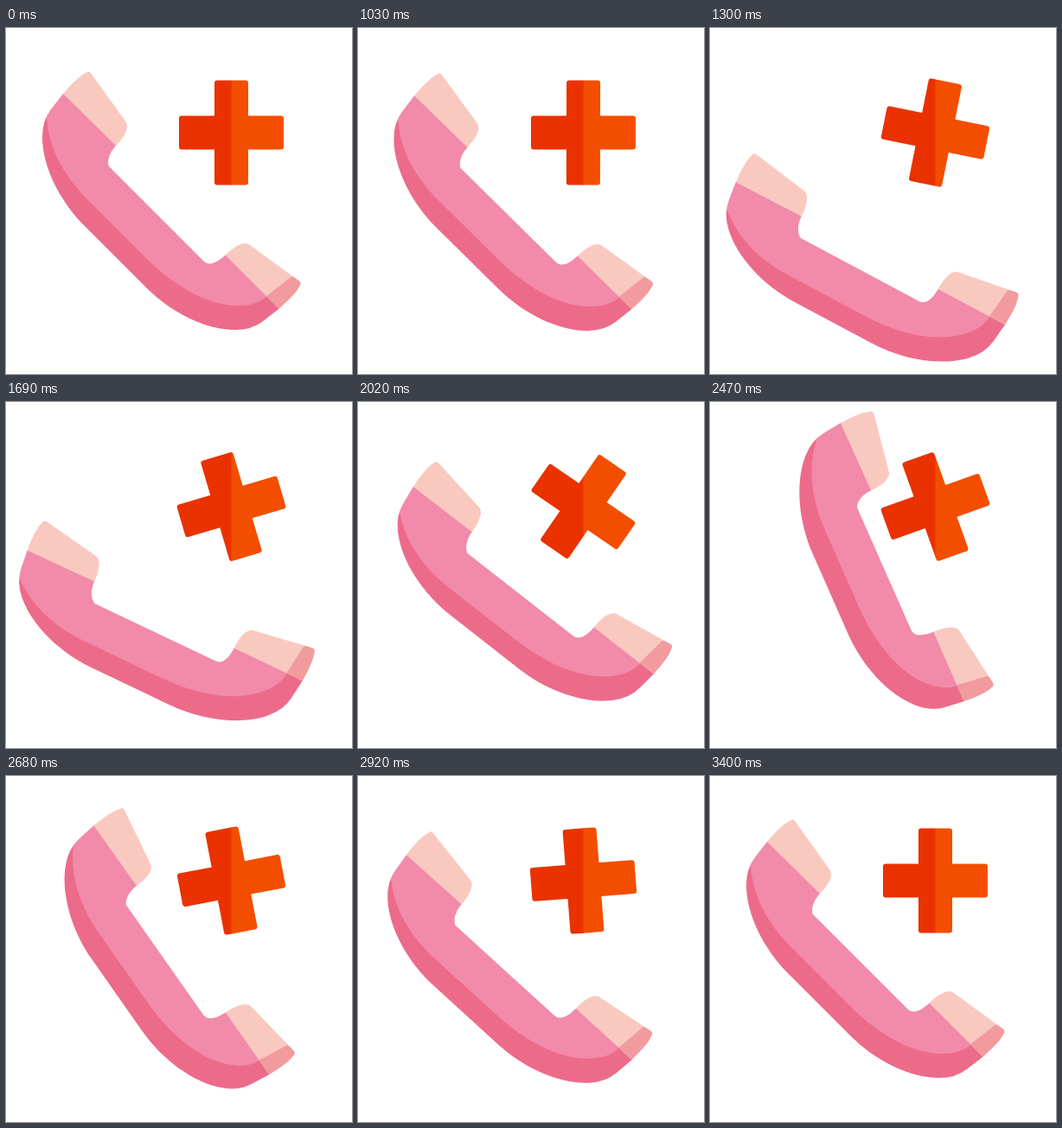
These frames come from a looping animation (400 px wide and 400 px high, 3.43 s). An HTML page:

```html
<!DOCTYPE html>
<html lang="en">
<head>
<meta charset="utf-8">
<title>Emergency call</title>
<style>
  html, body { margin: 0; width: 100%; height: 100%; overflow: hidden; background: #fff; }
  svg { display: block; width: 100%; height: 100%; }
</style>
</head>
<body>
<svg viewBox="0 0 400 400">
  <defs>
    <mask id="handset" maskUnits="userSpaceOnUse" x="0" y="0" width="400" height="400">
      <path fill="#fff" d="M66 76C78 62 86 55 92 52Q96 49 98 52L139 109Q141 113 139 119Q136 127 127 136
        C118 146 117 155 119 160L229 270C235 275 243 272 253 263Q262 254 270 250.5Q278 247.5 282 251
        L339 292.5Q342 295 339 299C336 305 329 313 315 325L297 339Q284 349 265 349
        C231 349 191 329 162 300L91 229C62 200 42 160 42 126Q42 107 52 94Z"/>
    </mask>
    <clipPath id="left"><rect width="261" height="400"/></clipPath>
    <clipPath id="right"><rect x="260.5" width="140" height="400"/></clipPath>
    <path id="plus" d="M244 60.5H277Q280 60.5 280 63.5V101.5H318Q321 101.5 321 104.5V137.5
      Q321 140.5 318 140.5H280V178.5Q280 181.5 277 181.5H244Q241 181.5 241 178.5V140.5H203
      Q200 140.5 200 137.5V104.5Q200 101.5 203 101.5H241V63.5Q241 60.5 244 60.5Z"/>
  </defs>

  <g id="phone">
    <g mask="url(#handset)">
      <path fill="#f28aa9" d="M0 0H400V400H0Z"/>
      <path fill="#ec6b8b" d="M30 103H47C49 138 66 170 94 198L162 266C200 304 238 321 268 321
        C286 321 295 316 302 310L330 288L360 400H0Z"/>
      <path fill="#f9c9c0" d="M66 76L127 136L170 110L95 30L60 70ZM253 262L315 324L370 300L280 220Z"/>
      <path fill="#f19b9e" d="M301 310L330 287.5L370 290L330 339Z"/>
    </g>
  </g>

  <g clip-path="url(#left)"><use class="cross" href="#plus" fill="#ea3200"/></g>
  <g clip-path="url(#right)"><use class="cross" href="#plus" fill="#f34e00"/></g>
</svg>

<script>
const LOOP = 3430, START = 1000, END = 3400, STEP = 30, BEAT = 300;
const phone = document.getElementById('phone');
const crosses = document.querySelectorAll('.cross');

// One key value per beat; the phone rests at both ends
const shiftX = [0, -5.4, -9, 2, 27, 30.5, 0, -5.5, 0];
const shiftY = [0, 60.3, 52, 27, -23, -13.3, 8.6, 5.5, 0];
const tilt = [0, -17, -20.3, -14, 5.5, 21.3, 1.2, -4.6, 0];

const slope = (keys, i) =>
  i > 0 && i < keys.length - 1 ? (keys[i + 1] - keys[i - 1]) / 2 : 0;

// Smooth cubic curve through evenly spaced keys
function curve(keys, pos) {
  const i = Math.min(Math.floor(pos), keys.length - 2);
  const s = pos - i, r = 1 - s;
  return keys[i] + (keys[i + 1] - keys[i]) * s * s * (3 - 2 * s) +
    s * r * (r * slope(keys, i) - s * slope(keys, i + 1));
}

// cubic-bezier(.333, 0, .2, 1)
function ease(x) {
  let lo = 0, hi = 1;
  for (let n = 0; n < 24; n++) {
    const s = (lo + hi) / 2, r = 1 - s;
    if (r * r * s + 0.6 * r * s * s + s * s * s < x) lo = s; else hi = s;
  }
  return lo * lo * (3 - 2 * lo);
}

function draw(now) {
  const steps = Math.floor((now % LOOP - START) / STEP);
  const t = Math.min(END - START, Math.max(0, steps * STEP));
  const [x, y, angle] = [shiftX, shiftY, tilt].map(keys => curve(keys, t / BEAT));
  const turn = 180 * ease(t / (END - START));
  phone.setAttribute('transform', `translate(${x} ${y}) rotate(${angle} 191 200)`);
  crosses.forEach(c => c.setAttribute('transform', `rotate(${turn} 260.5 121)`));
}

const begin = performance.now();
function tick() {
  draw(performance.now() - begin);
  requestAnimationFrame(tick);
}
tick();
</script>
</body>
</html>
```
